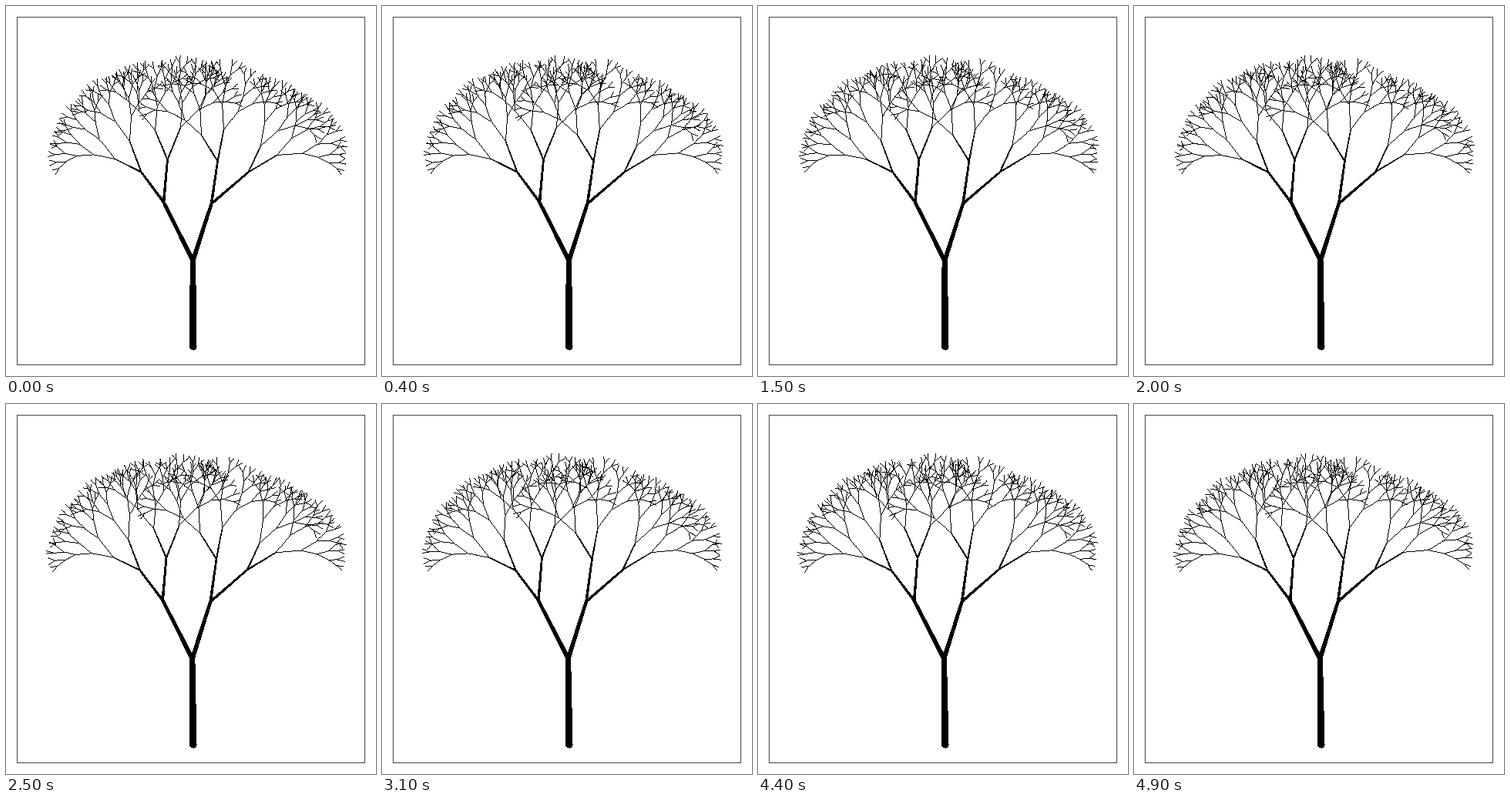
Animation, 480 px wide and 480 px high, one loop 5000 ms. Source, as an HTML page with a canvas:

```html
<!DOCTYPE html>
<html lang="en">
<head>
<meta charset="utf-8">
<title>Swaying tree</title>
<style>
  html, body { margin: 0; width: 100%; height: 100%; overflow: hidden; background: #fff; }
  canvas { display: block; width: 480px; height: 480px; }
</style>
</head>
<body>
<canvas id="stage" width="480" height="480"></canvas>
<script>
const ctx = document.getElementById('stage').getContext('2d');
const LOOP = 5000, STEP = 100;
const DEPTH = 8, NODES = 2 ** (DEPTH + 1);
const ROOT = { x: 242, y: 441 };
const RAD = Math.PI / 180;

// Where the main limbs fork, level by level, left to right.
const FORKS = [
  [242, 330],
  [204, 254], [266, 256],
  [175, 215], [209, 199], [274, 201], [314, 215],
  [141, 198], [160, 175], [193, 161], [226, 157],
  [253, 167], [282, 160], [330, 181], [351, 193]
];

// Above the main limbs every fork opens by the same spread, tilted a little.
const SPREAD = 42, BIAS = 5, TWIG = 30.5, SHRINK = 0.74;

let seed = 71;
function rand(size) {
  seed = (seed * 16807) % 2147483647;
  return (seed / 2147483647 * 2 - 1) * size;
}

const level = i => 31 - Math.clz32(i);
const width = lv => Math.max(1, 10 * 0.61 ** lv);
const flutter = lv => lv < 4 ? 0 : 0.35 * 2 ** (lv - 4);

function limbTo(i) {
  const [x, y] = FORKS[i - 1];
  const [px, py] = FORKS[(i >> 1) - 1] || [ROOT.x, ROOT.y];
  return { angle: Math.atan2(y - py, x - px), len: Math.hypot(x - px, y - py) };
}

function twigFrom(parent, i, lv) {
  const side = i % 2 ? 1 : -1;
  const turn = side * SPREAD / 2 + parent.tilt + rand(3);
  return {
    angle: parent.angle + turn * RAD,
    len: TWIG * SHRINK ** (lv - 4) * (1 + rand(0.08))
  };
}

function grow() {
  const tree = [];
  for (let i = 1; i < NODES; i++) {
    const lv = level(i);
    const part = i <= FORKS.length ? limbTo(i) : twigFrom(tree[i >> 1], i, lv);
    tree[i] = {
      ...part, lv,
      tilt: lv < 4 ? BIAS : rand(13),
      phase: rand(Math.PI),
      speed: 3 + rand(1.5)
    };
  }
  return tree;
}

// The whole tree eases over to the left, then rests until the loop restarts.
function lean(ms) {
  const p = Math.min(1, ms / 4200);
  return -0.58 * RAD * (1 - Math.cos(Math.PI * p)) / 2;
}

function dot(x, y, w) {
  if (w < 1.5) {
    ctx.fillRect(Math.round(x), Math.round(y), 1, 1);
    return;
  }
  const r = w / 2, cx = x + 0.5, cy = y + 0.5;
  for (let row = Math.round(cy - r); row < Math.round(cy + r); row++) {
    const dy = row + 0.5 - cy;
    const half = Math.sqrt(Math.max(0, r * r - dy * dy));
    const left = Math.round(cx - half);
    ctx.fillRect(left, row, Math.max(1, Math.round(cx + half) - left), 1);
  }
}

// Hard-edged tapering stroke.
function stroke(a, b, w) {
  const n = Math.ceil(Math.max(Math.abs(b.x - a.x), Math.abs(b.y - a.y)));
  for (let k = 0; k <= n; k++) {
    const u = k / n;
    dot(a.x + (b.x - a.x) * u, a.y + (b.y - a.y) * u, w * (1 - 0.28 * u));
  }
}

const tree = grow();

function draw(ms) {
  ctx.fillStyle = '#fff';
  ctx.fillRect(0, 0, 480, 480);
  ctx.strokeStyle = '#444';
  ctx.strokeRect(14.5, 14.5, 451, 451);
  ctx.fillStyle = '#000';

  const base = { ...ROOT, bend: lean(ms) };
  const pose = [];
  for (let i = 1; i < NODES; i++) {
    const { lv, angle, len, phase, speed } = tree[i];
    const from = pose[i >> 1] || base;
    const wave = Math.sin(phase + speed * ms / 1000) - Math.sin(phase);
    const bend = from.bend + wave * flutter(lv) * RAD;
    pose[i] = {
      x: from.x + Math.cos(angle + bend) * len,
      y: from.y + Math.sin(angle + bend) * len,
      bend
    };
    stroke(from, pose[i], width(lv));
  }
}

const start = performance.now();
let shown = -1;
function tick() {
  const ms = Math.floor((performance.now() - start) % LOOP / STEP) * STEP;
  if (ms !== shown) draw(shown = ms);
  requestAnimationFrame(tick);
}
tick();
</script>
</body>
</html>
```
